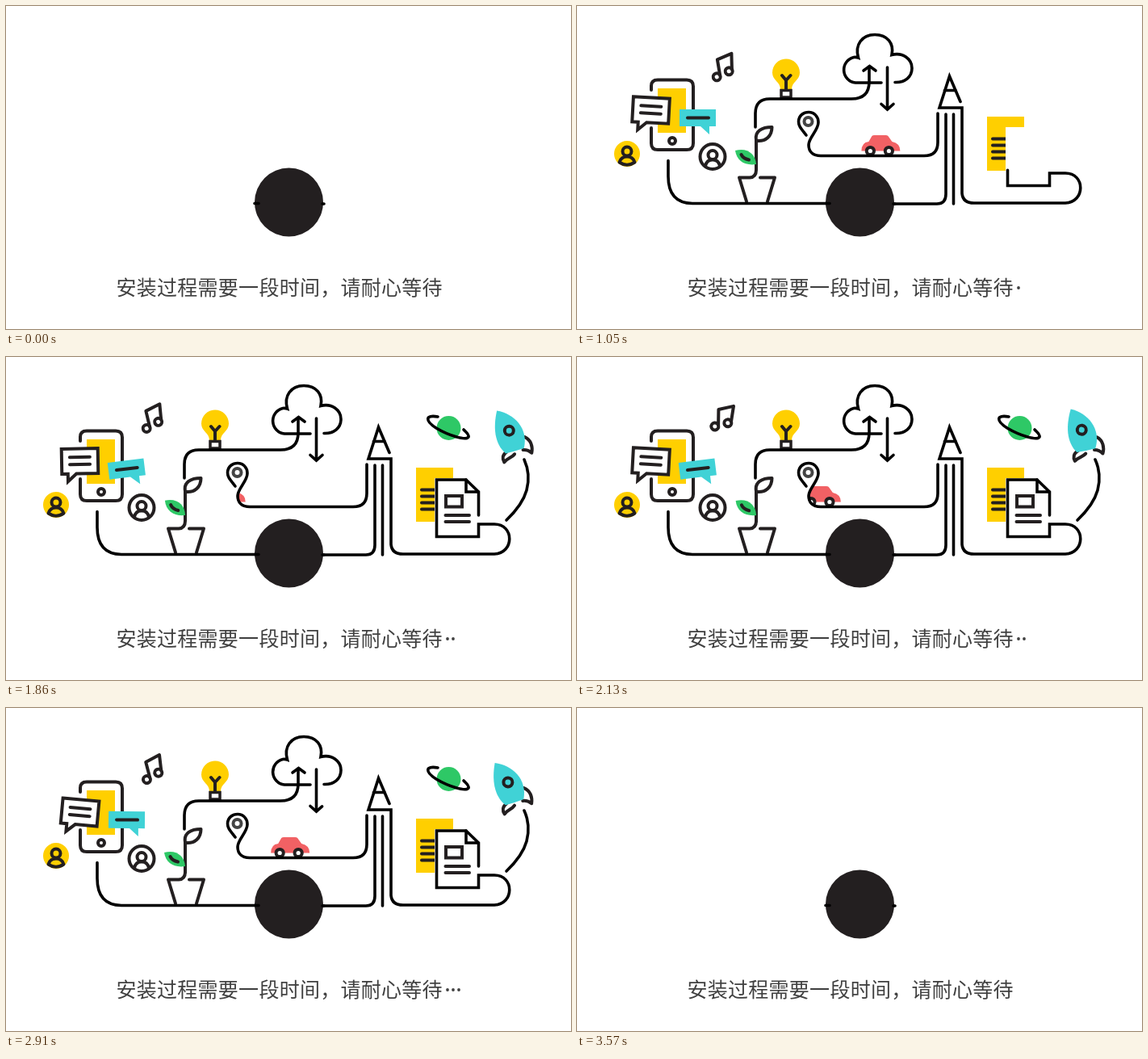
An HTML page that plays this animation: 700 px wide and 400 px high, repeating every 3600 ms.

```html
<!DOCTYPE html>
<html lang="zh-CN">
<head>
<meta charset="utf-8">
<style>
  html, body { margin: 0; width: 100%; height: 100%; overflow: hidden; background: #fff; }
  svg { display: block; width: 700px; height: 400px; }
  .line { fill: none; stroke: #000; stroke-width: 3.6; stroke-linecap: round; }
  .ink { fill: none; stroke: #231f20; stroke-width: 4; stroke-linecap: round; stroke-linejoin: round; }
  .paper { fill: #fff; }
  .yellow { fill: #ffcf00; }
  .cyan { fill: #40d2d6; }
  .green { fill: #2ec866; }
  .red { fill: #f16164; }
  text { font: 25px "Noto Sans CJK SC", "Noto Sans CJK", sans-serif; letter-spacing: .27px; fill: #404040; }
</style>
</head>
<body>
<!-- data-draw / data-fade: start and end of entering, start and end of leaving (ms) -->
<svg viewBox="0 0 700 400">
  <defs>
    <clipPath id="road"><path d="M299 144C299 154 287 163 287 172C287 181 293 186 302 186H445V140Z"/></clipPath>
  </defs>

  <!-- phone, bubbles and users -->
  <rect class="yellow" x="100" y="102" width="35" height="55" data-fade="480 600 3300 3480"/>
  <path class="ink" d="M92 104V99Q92 91.500 100 91.500H136Q144 91.500 144 99.500V170Q144 178 136 178H100Q92 178 92 170V151" data-draw="420 600 3270 3510"/>
  <circle class="ink" cx="118" cy="167" r="4" stroke-width="3.500" data-fade="540 630 3300 3480"/>
  <g data-fade="570 690 3330 3510"><g id="cyan">
    <path class="cyan" d="M127 128H172V149H164V159L153 149H127Z"/>
    <path class="ink" d="M137 138.500H163"/>
  </g></g>
  <g data-fade="540 660 3330 3510"><g id="bubble">
    <path class="ink paper" style="stroke-linejoin:miter" d="M69 113.500H114V144.500H87L76.500 154V144.500H69Z"/>
    <path class="ink" d="M79 124H104M79 133H104"/>
  </g></g>
  <g data-fade="570 690 2970 3420">
    <circle class="yellow" cx="62" cy="183" r="16"/>
    <circle class="ink" cx="62" cy="180" r="5.500"/>
    <path class="ink" d="M52.500 193.500C55 184 69 184 71.500 193.500Q62 200 52.500 193.500Z"/>
  </g>
  <g data-fade="600 690 3300 3510">
    <circle class="ink paper" cx="168" cy="186.500" r="15.500"/>
    <circle class="ink" cx="168" cy="184.500" r="5.500"/>
    <path class="ink" d="M159 198Q161 190 168 190.500Q175 190 177 198"/>
  </g>
  <g data-fade="570 690 3330 3510"><g id="note" class="ink">
    <path d="M173.500 83L177 64L196 63L190 81"/>
    <circle cx="169" cy="84" r="4.500"/><circle cx="185.500" cy="82.500" r="4.500"/>
  </g></g>

  <!-- plant and bulb -->
  <path class="ink" d="M210 242L201 212.500H214Q222 212 222 203V166C220 155 229 150 241.500 150C241.500 161 234 168 223 167" data-draw="300 510 3270 3510"/>
  <path class="ink" d="M236 242L245 212.500H227" data-draw="300 420 3360 3510"/>
  <g data-fade="450 570 3300 3480"><g id="leaf">
    <path class="green" d="M196 179C211 175 221 183 222 196C208 198 198 192 196 179Z"/>
    <path class="ink" d="M203.500 184Q206 189 213 190.500"/>
  </g></g>
  <g data-fade="480 600 3300 3480">
    <path class="yellow" d="M252 103C252 94 242 92 242 82.500A17 17 0 0 1 276 82.500C276 92 266 94 266 103Z"/>
    <path class="ink" d="M254 86L259 92L264.500 86M259 92V103"/>
    <rect class="ink paper" style="stroke-width:3.500;stroke-linejoin:miter" x="253" y="104.500" width="12" height="8.500"/>
  </g>

  <!-- car, pin and cloud -->
  <g clip-path="url(#road)"><g id="car">
    <path class="red" d="M0 179.500Q0 169 9 168L13 161Q14 160 16 160H30Q32 160 33 161L38 168Q48 170 48 179.500Z"/>
    <circle class="ink paper" cx="11" cy="179.500" r="4.600"/><circle class="ink paper" cx="34" cy="179.500" r="4.600"/>
  </g></g>
  <path class="line" d="M284 160C278 152 274.500 149 274.500 143C275 135 281 131.500 287 131.500C294 131.500 299 137 299 144C299 154 287 163 287 172C287 181 293 185.500 302 185.500H430Q447 185.500 447 169V133" data-draw="330 660 2970 3430"/>
  <circle class="ink" style="stroke:#444" cx="286.500" cy="143" r="5" data-fade="420 510 3330 3510"/>
  <path class="line" d="M221 150V133Q221 115 239 115H340Q362 115 362 94V75" data-draw="360 570 3270 3540"/>
  <path class="line" d="M355 80L362.500 74.500L370 80" data-draw="540 600 2970 3430"/>
  <path class="line" d="M377 95H345A16 16 0 0 1 343 63.500Q346 63 348.500 64C344 48 353 35.500 369 35.500C385 35.500 393 47 390 60.500C404 57 415 66 415 77C415 88 406 95 394 94.500" data-draw="360 660 2940 3400"/>
  <path class="line" d="M384.500 76V127" data-draw="480 630 2970 3430"/>
  <path class="line" d="M377 121.500L384.500 128L392 121.500" data-draw="600 660 2900 3330"/>

  <!-- base lines -->
  <path class="line" d="M313 244.500H143Q113 244 113 211V191.500" data-draw="180 480 2970 3430"/>
  <path class="line" d="M457 134V233Q457 245 446 245H392" data-draw="300 570 2970 3430"/>
  <path class="line" d="M466.500 134V245" data-draw="390 570 2970 3430"/>
  <path class="line" d="M455.500 104.500H469" data-draw="510 570 3390 3510"/>

  <!-- documents -->
  <g data-fade="750 900 3300 3480">
    <rect class="yellow" x="508" y="137" width="46" height="67"/>
    <path class="ink" d="M515 164.500H531M515 172.500H531M515 180.500H531M515 188.500H531"/>
  </g>
  <path class="paper" d="M531 150H571L587 166V224H531Z" data-fade="870 900 3450 3480"/>
  <path class="line" d="M475 118.500L461.500 87L449 126H477V232Q478 244 492 244H605C630 243 630 207 605 207H585.500V222.500H533.500V152H570L585.500 167V196" data-draw="441 1217 3230 3560"/>
  <g data-fade="1110 1230 3300 3480">
    <path class="line" d="M570 152V167H585"/>
    <path class="ink" style="stroke-linejoin:miter" d="M545 172H565V185.500H545ZM544.500 196H574M544.500 204H574"/>
  </g>

  <!-- planet and rocket -->
  <circle class="green" cx="548.500" cy="88" r="15" data-fade="1110 1230 3050 3450"/>
  <path class="line" d="M535 74C519 71 519 79 533 88C548 97 570 104 573 99C574 96 570 93 567 90" data-draw="1110 1260 2970 3430"/>
  <path class="line" d="M620 202Q640 183 645 165C649 150 647 138 642 127" data-draw="1080 1220 2970 3430"/>
  <g data-fade="1140 1260 3540 3560"><g id="rocket">
    <path class="ink paper" d="M641 99C649 102 652 110 651 118Q646 114 640 115M620 119C615 123 615 128 618 132C622 126 627 126 630 121"/>
    <path class="cyan" d="M604 69C626 71 645 88 641 113Q629 118 619 121C604 110 601 90 604 69Z"/>
    <circle class="ink" cx="621" cy="92.500" r="5.500"/>
  </g></g>

  <circle cx="350.500" cy="243" r="42.500" fill="#231f20"/>
  <path class="line" d="M308 244.500H313M392 245H394"/>
  <text x="136.500" y="358">安装过程需要一段时间，请耐心等待</text>
  <g id="dots" fill="#404040">
    <circle cx="547" cy="349" r="1.900"/><circle cx="554" cy="349" r="1.900"/><circle cx="561" cy="349" r="1.900"/>
  </g>
</svg>
<script>
  const LOOP = 3600;
  const $ = id => document.getElementById(id);
  const clamp = v => Math.max(0, Math.min(1, v));
  const place = (id, transform) => $(id).setAttribute('transform', transform);

  const collect = kind => [...document.querySelectorAll(`[data-${kind}]`)].map(el =>
    ({ el, times: el.dataset[kind].split(' ').map(Number) }));
  const drawn = collect('draw'), faded = collect('fade');
  for (const { el } of drawn) el.setAttribute('pathLength', 1);

  const presence = (t, [a, b, c, d]) =>
    Math.min(clamp((t - a) / (b - a)), clamp((d - t) / (d - c)));

  const wave = (t, period, phase) => Math.sin((t / period * 360 + phase) * Math.PI / 180);

  // Eased swing between resting angles
  const beats = [1050, 1560, 2130, 2610, 3210];
  function sway(t, angles) {
    if (t <= beats[0]) return angles[0];
    const i = beats.findIndex(b => b > t);
    if (i < 0) return angles.at(-1);
    const k = (t - beats[i - 1]) / (beats[i] - beats[i - 1]);
    return angles[i - 1] + (angles[i] - angles[i - 1]) * (1 - Math.cos(Math.PI * k)) / 2;
  }

  function carLeft(t) {
    const half = 725, u = (t - 470) / half;
    if (u < 0 || u > 4) return 230;
    return 237 + 144 * (1 - Math.abs(u % 2 - 1));
  }

  function render(t) {
    for (const { el, times } of drawn) {
      const p = presence(t, times);
      el.style.visibility = p > 0 ? 'visible' : 'hidden';
      el.style.strokeDasharray = p < 1 ? '1 2' : 'none';
      el.style.strokeDashoffset = 1 - p;
    }
    for (const { el, times } of faded) el.style.opacity = presence(t, times);

    place('car', `translate(${carLeft(t)} 0)`);
    place('note', `rotate(${-18 + 26 * wave(t - 1050, 523, -5)} 182 74)`);
    place('bubble', `rotate(${1 + 18 * wave(t - 1050, 540, 6)} 91 130)`);
    place('cyan', `rotate(${sway(t, [0, -7, -7, 0, 1])} 150 140)`);
    place('leaf', `rotate(${sway(t, [0, 4, 2, 0, 0])} 222 196)`);

    const lift = 0.0008 * Math.max(0, t - 3060) ** 2;
    place('rocket', `translate(${-0.3 * lift} ${-lift}) rotate(${sway(t, [0, 0, 8, 3.5, 0])} 640 122)`);

    [...$('dots').children].forEach((dot, i) =>
      dot.style.visibility = t >= 900 * (i + 1) && t < 3560 ? 'visible' : 'hidden');
  }

  const start = performance.now();
  function tick() {
    render((performance.now() - start) % LOOP);
    requestAnimationFrame(tick);
  }
  tick();
</script>
</body>
</html>
```
